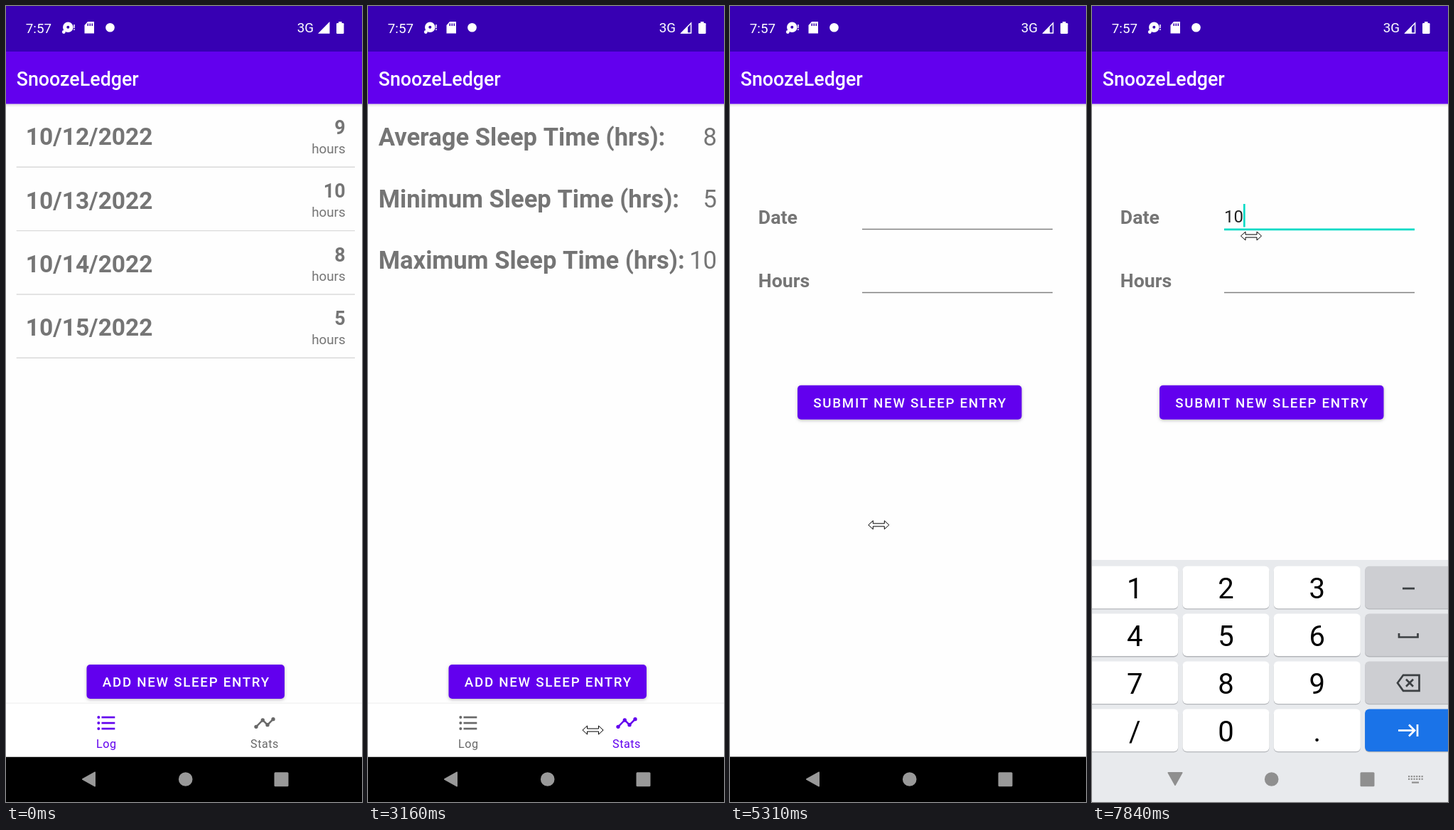
Write an HTML page with a canvas that moves like this. It is 501 px wide and 1118 px high and loops after 8 s.

```html
<!DOCTYPE html>
<html lang="en">
<head>
<meta charset="utf-8">
<title>Sleep log</title>
<style>
html, body { margin: 0; width: 100%; height: 100%; overflow: hidden; background: #fefefe; }
canvas { display: block; }
</style>
</head>
<body>
<canvas id="stage" width="501" height="1118"></canvas>
<script>
const ctx = document.getElementById('stage').getContext('2d');
const W = 501, H = 1118, LOOP = 8000;
const PURPLE = '#6200ee', DARK = '#3700b3', PAPER = '#fefefe', GREY = '#757575', TEAL = '#03dac5';
const clamp = v => Math.max(0, Math.min(1, v));
const span = (t, from, to) => clamp((t - from) / (to - from));

// time, x, y of the pointer
const POINTER = [
  [690, 480, 1118], [1440, 406, 1023], [1930, 360, 1023], [2069, 360, 1023], [2070, 360, 1017],
  [2500, 360, 1017], [3230, 312, 1017], [4040, 235, 947], [4370, 235, 947], [4700, 195, 923],
  [4900, 195, 923], [4970, 191, 932], [5660, 228, 521], [6010, 241, 270], [6280, 241, 270],
  [6450, 231, 287], [6850, 231, 287], [7000, 224, 323]
];
const CLICKS = [[2070, 2280], [4170, 4230], [6620, 6690]];

function text(str, x, y, size, { weight = 400, color = '#fff', align = 'left', spacing = 0 } = {}) {
  ctx.font = `${weight} ${size}px Roboto, sans-serif`;
  ctx.letterSpacing = spacing + 'px';
  ctx.textAlign = align;
  ctx.fillStyle = color;
  ctx.fillText(str, x, y);
}

function rect(x, y, w, h, color, radius = 0) {
  ctx.fillStyle = color;
  ctx.beginPath();
  ctx.roundRect(x, y, w, h, radius);
  ctx.fill();
}

function dot(x, y, r, color) {
  ctx.fillStyle = color;
  ctx.beginPath();
  ctx.arc(x, y, r, 0, 7);
  ctx.fill();
}

function path(points, { fill, stroke, width = 1, close = false }) {
  ctx.beginPath();
  points.forEach(([x, y]) => ctx.lineTo(x, y));
  if (close) ctx.closePath();
  if (fill) { ctx.fillStyle = fill; ctx.fill(); }
  if (stroke) { ctx.strokeStyle = stroke; ctx.lineWidth = width; ctx.stroke(); }
}

function at(x, y, draw) {
  ctx.save();
  ctx.translate(x, y);
  draw();
  ctx.restore();
}

function button(x, y, w, label, press = 0) {
  ctx.save();
  ctx.shadowColor = 'rgba(0,0,0,.25)';
  ctx.shadowBlur = 4 + press;
  ctx.shadowOffsetY = 1.6 + 0.5 * press;
  rect(x, y, w, 48, PURPLE, 5);
  ctx.restore();
  rect(x, y, w, 48, `rgba(255,255,255,${0.08 * press})`, 5);
  text(label, x + 22.3, y + 31.4, 18.75, { weight: 500, spacing: 1.7 });
}

function windowFrame() {
  rect(0, 0, W, H, PAPER);
  const shadow = ctx.createLinearGradient(0, 137.5, 0, 142);
  shadow.addColorStop(0, '#dcdcdc');
  shadow.addColorStop(1, PAPER);
  rect(0, 137.5, W, 4.5, shadow);
  rect(0, 0, W, 64, DARK);
  rect(0, 64, W, 73.6, PURPLE);
  text('SnoozeLedger', 14.7, 111.5, 26.8, { weight: 500 });
  rect(0, 1054.5, W, 64, '#000');
}

function tabs(statsActive) {
  rect(0, 978.5, W, 1.5, '#f3f3f3');
  rect(0, 980, W, 74.5, '#fff');
  const logColor = statsActive ? '#686868' : PURPLE;
  const statsColor = statsActive ? PURPLE : '#686868';
  for (const dy of [-8, 0, 8]) {
    dot(130.3, 1007 + dy, 2, logColor);
    rect(134.5, 1005.7 + dy, 18.8, 2.67, logColor);
  }
  const peaks = [[352, 1012.3], [361.3, 1003], [368, 1009.7], [376, 1001.7]];
  path(peaks, { stroke: statsColor, width: 2.4 });
  peaks.forEach(([x, y]) => dot(x, y, 2.67, statsColor));
  text('Log', 141.3, 1041.5, 16.1, { color: logColor, align: 'center', spacing: 0.53 });
  text('Stats', 364, 1041.5, 16.1, { color: statsColor, align: 'center', spacing: 0.53 });
}

function logScreen() {
  [9, 10, 8, 5].forEach((hours, i) => {
    const y = 89.33 * i;
    text(`10/${12 + i}/2022`, 27.7, 195.3 + y, 33.5, { weight: 700, color: GREY });
    text(hours, 477.6, 180 + y, 26.8, { weight: 700, color: GREY, align: 'right' });
    text('hours', 477.6, 207 + y, 18.75, { color: GREY, align: 'right' });
    rect(14.7, 225.6 + y, 476.3, 1.4, '#dadada');
  });
}

function statsScreen() {
  [['Average', 8], ['Minimum', 5], ['Maximum', 10]].forEach(([name, value], i) => {
    const y = 196.4 + 86.5 * i;
    text(`${name} Sleep Time (hrs):`, 14.7, y, 34.58, { weight: 700, color: GREY });
    text(value, 491, y, 34.58, { color: GREY, align: 'right' });
  });
}

function mainWindow(t) {
  windowFrame();
  (t < 2500 ? logScreen : statsScreen)();
  button(113.5, 925, 278.5, 'ADD NEW SLEEP ENTRY', span(t, 4340, 4500));
  tabs(t >= 2430);
}

function formWindow(t) {
  windowFrame();
  text('Date', 39.8, 305.8, 26.67, { weight: 700, color: GREY });
  text('Hours', 39.8, 394.8, 26.67, { weight: 700, color: GREY });
  if (t < 6690) rect(186, 312.8, 268, 1.4, '#808080');
  else rect(186, 312.6, 268, 2.7, TEAL);
  rect(186, 401.8, 268, 1.4, '#808080');
  button(95, 532.7, 315.5, 'SUBMIT NEW SLEEP ENTRY');
  const typed = t < 7650 ? '' : t < 7840 ? '1' : '10';
  text(typed, 186, 303.7, 24, { color: '#212121' });
  if (t >= 6890) rect(186 + ctx.measureText(typed).width, 278, 2.67, 32.5, TEAL);
}

function scaled(scale, alpha, draw) {
  ctx.save();
  ctx.globalAlpha = alpha;
  ctx.translate(W / 2 + 2, H / 2);
  ctx.scale(scale, scale);
  ctx.translate(-W / 2 - 2, -H / 2);
  draw();
  ctx.restore();
}

// Slow lift-off, quick middle, long settling
function openingCurve(u) {
  return u < 1 / 6 ? 0.4 * (6 * u) ** 5 : 1 - 0.6 * ((1 - u) * 1.2) ** 9;
}

function windows(t) {
  const progress = openingCurve(span(t, 4926, 5326));
  const alpha = span(t, 4975, 5040);
  if (progress < 1) scaled(1 + 0.15 * progress, 1, () => mainWindow(t));
  rect(0, 1059, W, 59, '#000');
  if (alpha) scaled(0.85 + 0.15 * progress, alpha, () => formWindow(t));
}

function statusIcons(t) {
  text('7:57', 27.8, 38, 18.75);
  dot(87.3, 29.8, 7.3, '#fff');
  dot(87.3, 29.8, 2, DARK);
  dot(81.3, 36.5, 2.4, '#fff');
  rect(95.2, 26, 1.5, 5, '#fff');
  rect(95.2, 32.3, 1.5, 1.6, '#fff');
  path([[115, 22], [124, 22], [124, 38.5], [110.5, 38.5], [110.5, 27]], { fill: '#fff', close: true });
  for (const x of [114.5, 117.5, 120.5]) rect(x, 24.5, 1.5, 3.5, DARK);
  dot(146.5, 30.3, 6.3, '#fff');
  text('3G', 409.8, 37.2, 18.75);
  if (t < 2700) {
    path([[439, 38.8], [455.5, 38.8], [455.5, 22]], { fill: '#fff', close: true });
  } else {
    path([[441, 38], [454.6, 38], [454.6, 24]], { stroke: '#fff', width: 1.5, close: true });
    path([[440, 38.5], [450, 38.5], [450, 28.5]], { fill: '#fff', close: true });
  }
  rect(465, 24, 10.5, 15, '#fff', 1.3);
  rect(468, 22, 4.5, 3, '#fff');
}

function keyboard(t) {
  const left = 1 - span(t, 6890, 7130);
  at(0, 340 * left ** 3, () => {
    rect(0, 778, W, 400, '#e8eaed');
    ['123−', '456_', '789<', '/0.>'].forEach((row, r) => {
      const top = 786.7 + 66.9 * r;
      [...row].forEach((key, c) => {
        const x = -0.8 + 128.3 * c, color = c < 3 ? '#fff' : r < 3 ? '#cdced2' : '#1a73e8';
        const keyX = c ? x : x - 8, width = c ? 122 : 130;
        rect(keyX, top + 1.3, width, 59.5, '#b4b6ba', 6);
        rect(keyX, top, width, 59.5, color, 6);
        if (c < 3) text(key, x + 61, top + 45.2, 40, { color: '#000', align: 'center' });
      });
    });
    const ink = { stroke: '#3c4043', width: 2.7 };
    rect(437, 816.7, 17, 2.8, '#3c4043');
    path([[432, 881], [432, 886.5], [458.5, 886.5], [458.5, 881]], ink);
    at(445, 950.8, () => {
      path([[-15, 0], [-7, -11], [15.5, -11], [15.5, 11], [-7, 11]], { ...ink, close: true });
      path([[-3, -5], [7, 5]], ink);
      path([[-3, 5], [7, -5]], ink);
    });
    at(445, 1017.5, () => {
      const white = { stroke: '#fff', width: 2.7 };
      path([[-14, 0], [8, 0]], white);
      path([[1, -8], [9, 0], [1, 8]], white);
      path([[13, -8.5], [13, 8.5]], white);
    });
  });
}

function navIcons(t) {
  const shade = t < 6960 ? 153 : Math.round(177 - 34 * span(t, 7130, 7360));
  const color = `rgb(${shade},${shade},${shade})`;
  at(117, 1086 - span(t, 7130, 7330), () => {
    ctx.rotate(-Math.PI / 2 * span(t, 7130, 7330));
    ctx.lineJoin = 'round';
    path([[-9.3, 0], [8.2, -9.8], [8.2, 9.8]], { fill: color, stroke: color, width: 1.5, close: true });
  });
  dot(252.7, 1086, 9.8, color);
  rect(377.5, 1076.2, 20, 20, color, 1.5);
  if (t < 6960) return;
  for (let row = 0; row < 2; row++)
    for (let col = 0; col < 6; col++) rect(445 + 3.7 * col, 1081 + 3.7 * row, 2.2, 2.2, color);
  rect(450, 1089.5, 10, 2.2, color);
}

function pointer(t) {
  if (t < POINTER[0][0]) return;
  let i = POINTER.findIndex(p => p[0] > t);
  if (i < 0) i = POINTER.length - 1;
  const [t0, x0, y0] = POINTER[i - 1], [t1, x1, y1] = POINTER[i];
  const k = span(t, t0, t1);
  at(x0 + (x1 - x0) * k, y0 + (y1 - y0) * k, () => {
    const half = [[-14.5, 0], [-8, -6], [-8, -2], [8, -2], [8, -6], [14.5, 0]];
    const lower = half.slice(1, -1).map(([x, y]) => [x, -y]).reverse();
    path([...half, ...lower], { fill: '#fff', stroke: '#000', close: true });
    if (CLICKS.some(([on, off]) => t >= on && t < off)) dot(0.5, 0, 19.5, 'rgba(255,208,20,.6)');
  });
}

function render(t) {
  windows(t);
  statusIcons(t);
  if (t >= 6890) keyboard(t);
  navIcons(t);
  pointer(t);
}

const start = performance.now();
function frame() {
  const t = (performance.now() - start) % LOOP;
  // The opening window pauses briefly before it jumps forward
  render(t > 4970 && t < 5050 ? 4970 : t);
  requestAnimationFrame(frame);
}
frame();
</script>
</body>
</html>
```
